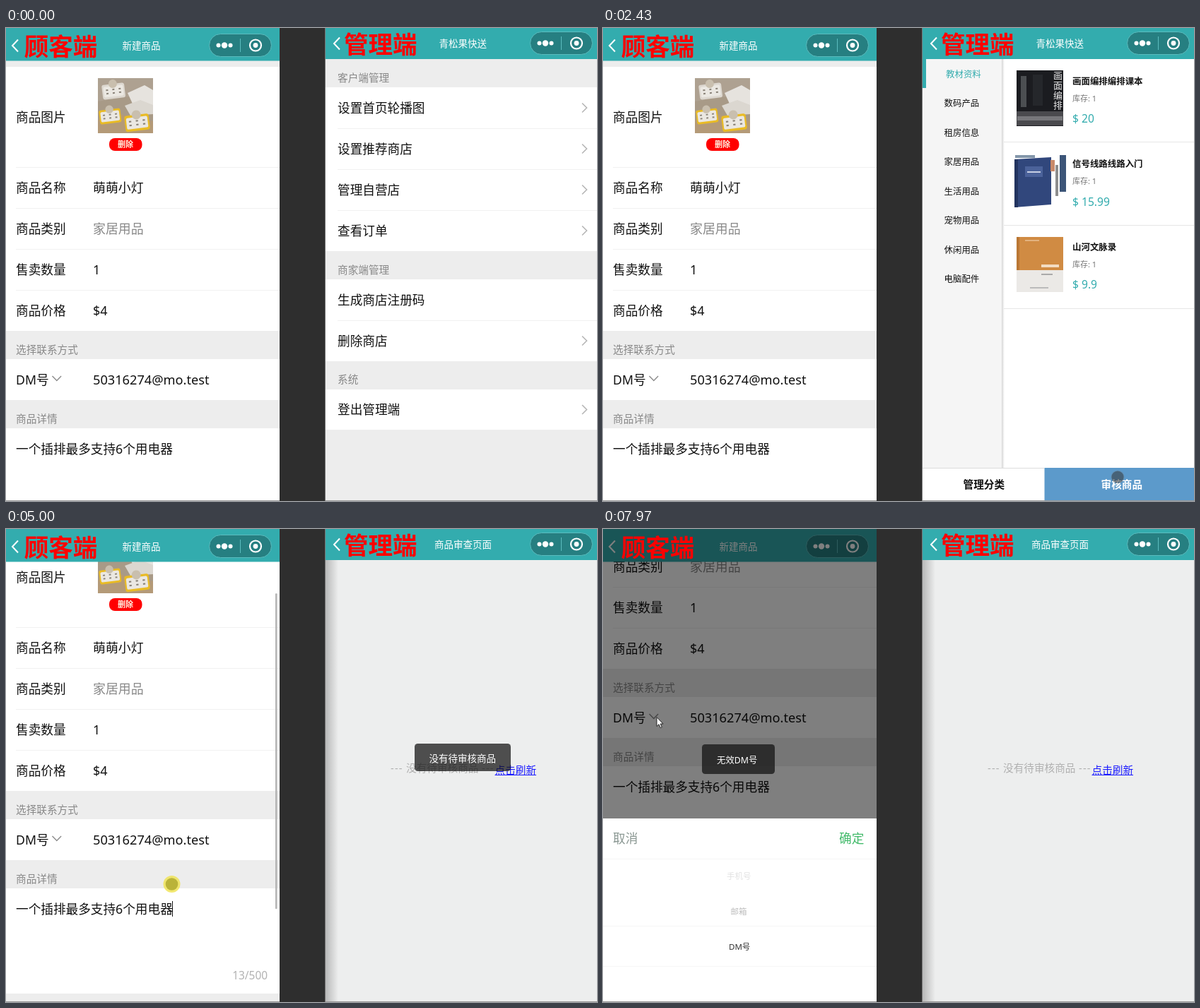
Write an HTML page that moves like this. It is 836 px wide and 670 px high and loops after 8000 ms.

```html
<!DOCTYPE html>
<html lang="zh-CN">
<head>
<meta charset="utf-8">
<title>新建商品与审核</title>
<style>
html, body { margin: 0; width: 100%; height: 100%; overflow: hidden; background: #2e2e2e; }
svg { display: block; width: 836px; height: 670px; }
text { font-family: 'Noto Sans', 'Noto Sans CJK SC', 'Noto Sans CJK', sans-serif; white-space: pre; }
</style>
</head>
<body>
<svg id="stage" viewBox="0 0 836 670" xmlns="http://www.w3.org/2000/svg"></svg>
<script>
const LOOP = 8000, TEAL = '#33acae', GREY = '#ededed', INK = '#111', DIM = '#888';
const BODY = 17.65, SMALL = 14.65, LEFT_W = 387;

// ---- drawing helpers: all return SVG markup ----
const rect = (x, y, w, h, fill, more = '') =>
  `<rect x="${x}" y="${y}" width="${w}" height="${h}" fill="${fill}" ${more}/>`;
const circle = (x, y, r, fill, more = '') =>
  `<circle cx="${x}" cy="${y}" r="${r}" fill="${fill}" ${more}/>`;
const path = (d, stroke, w, fill = 'none') =>
  `<path d="${d}" stroke="${stroke}" stroke-width="${w}" fill="${fill}"/>`;
const poly = (pts, fill) => `<polygon points="${pts}" fill="${fill}"/>`;
const group = (id, inner, more = '') => `<g id="${id}" ${more}>${inner}</g>`;
// cy is the middle of the line of text
const text = (x, cy, size, str, fill = INK, more = '') =>
  `<text x="${x}" y="${(cy + size * 0.37).toFixed(2)}" font-size="${size}" fill="${fill}" ${more}>${str}</text>`;
const BOLD = 'font-weight="700"';

function header(x, w, h, cy, backX, capX) {
  const c = cy - 0.5;
  return rect(x, 0, w, h, TEAL) +
    path(`M${backX + 8.5} ${cy - 8}l-8 8.5l8 8.5`, '#fff', 2) +
    rect(capX + 0.5, c - 15.5, 88, 32, '#267f81', 'rx="16" stroke="#5bbcbe"') +
    circle(capX + 13.5, c + 0.5, 3, '#fff') + circle(capX + 22, c + 0.5, 4.2, '#fff') +
    circle(capX + 30.5, c + 0.5, 3, '#fff') +
    rect(capX + 44, c - 9, 1, 19, '#5bbcbe') +
    circle(capX + 66, c + 0.5, 8, 'none', 'stroke="#fff" stroke-width="2.2"') +
    circle(capX + 66, c + 0.5, 3.4, '#fff');
}

function toast(id, x, y, w, h, inner) {
  return group(id, rect(x, y, w, h, '#111', 'rx="4.5" fill-opacity=".72"') + inner);
}

function lamp(x, y, s, band) {
  return `<g transform="translate(${x} ${y}) scale(${s}) rotate(-7)">` +
    rect(0, 0, 32, 21, band, 'rx="3"') + rect(2, 3, 28, 15, '#ebe8e2', 'rx="2"') +
    circle(16, 0, 6, '#c9bfae') +
    [7, 16, 25].map(i => rect(i - 1.5, 7, 3, 2, '#8a8378') + rect(i - 1.5, 12, 3, 2, '#8a8378')).join('') + '</g>';
}

// ---- left phone ----
function form() {
  const photo = rect(130, 71, 78, 78, '#a89a87') + poly('130,71 208,71 208,92 130,104', '#aea191') +
    poly('130,149 208,149 208,132 160,122 130,130', '#b49a78') +
    lamp(135, 81, 1, '#ddd8d0') + poly('172,92 196,81 208,88 208,112 184,118', '#e6e3de') +
    poly('168,110 190,102 208,109 208,122 176,124', '#dbd7d0') +
    lamp(131, 117, 0.95, '#e9bb25') + lamp(167, 125, 1.08, '#e9bb25');
  const rows = [[226, '商品名称', '萌萌小灯'], [284, '商品类别', '家居用品', DIM],
    [342, '售卖数量', '1'], [400, '商品价格', '$4']];
  return rect(0, 46, LEFT_W, 900, GREY) + rect(0, 55, LEFT_W, 374, '#fff') +
    text(14, 126.5, BODY, '商品图片') + photo +
    rect(146, 156, 46.5, 18, '#f00', 'rx="8"') +
    text(158, 164.8, 11, '删除', '#fff0e0', BOLD) +
    rows.map(([y, a, b, c]) => rect(14, y - 29, 373, 1, '#f1f1f1') +
      text(14, y, BODY, a) + text(123, y, 17.9, b, c)).join('') +
    text(14, 456, SMALL, '选择联系方式', DIM) +
    rect(0, 469, LEFT_W, 58, '#fff') + text(14, 498, BODY, 'DM号') +
    path('M65.5 493l6.3 6.5l6.3-6.5', '#8c8c8c', 1.4) +
    text(123, 498, 18.2, '50316274@mo.test') +
    text(14, 554, SMALL, '商品详情', DIM) +
    rect(0, 567, LEFT_W, 149, '#fff') + text(14, 596, BODY, '一个插排最多支持6个用电器') +
    text(370, 690, 15.4, '13/500', '#b2b2b2', 'text-anchor="end"') +
    text(15, 737, SMALL, '阅读', DIM) +
    text(47, 737, SMALL, '《会员提交物件处理细则》', '#576b95') +
    rect(61, 779, 273, 41, '#000', 'rx="20.5" opacity=".22" filter="url(#soft)"') +
    rect(55.5, 774, 273, 41, TEAL, 'rx="20.5"') +
    text(152.5, 795, 19.7, '保存发布', '#fff', BOLD) +
    rect(235, 585, 1, 22, '#111', 'id="caret"');
}

function picker() {
  return rect(0, 410, LEFT_W, 260, '#fff') +
    text(14, 438, BODY, '取消', '#8b9893') + text(334, 438, BODY, '确定', '#3fb968', 'font-weight="500"') +
    [467, 562, 619].map(y => rect(0, y, LEFT_W, 1, '#f6f6f6')).join('') +
    text(175, 491.5, 11.5, '手机号', '#e2e2e2') + text(180.5, 541.5, 11.5, '邮箱', '#bdbdbd') +
    text(178, 591.5, 11.5, 'DM号', '#333');
}

// ---- right phone ----
function menu() {
  const rows = [[113, '设置首页轮播图'], [171, '设置推荐商店'], [229, '管理自营店'], [287, '查看订单'],
    [385, '生成商店注册码'], [443, '删除商店'], [540.5, '登出管理端']];
  return rect(452, 44, 384, 626, GREY) +
    [[84, 232], [356, 116], [512, 57]].map(([y, h]) => rect(452, y, 384, h, '#fff')).join('') +
    rect(452, 200, 384, 58, '#ececec', 'id="press"') +
    [142, 200, 258, 414].map(y => rect(469, y, 367, 1, '#f1f1f1')).join('') +
    [[71, '客户端管理'], [343, '商家端管理'], [498, '系统']].map(([y, s]) => text(469, y, SMALL, s, DIM)).join('') +
    rows.map(([y, s]) => text(469, y, BODY, s) +
      (y === 385 ? '' : path(`M815 ${y - 6.5}l6.5 6.5l-6.5 6.5`, '#b6b6b6', 1.6))).join('');
}

function shop() {
  const kinds = ['教材资料', '数码产品', '租房信息', '家居用品', '生活用品', '宠物用品', '休闲用品', '电脑配件'];
  const goods = [['画面编排编排课本', '$ 20'], ['信号线路线路入门', '$ 15.99'], ['山河文脉录', '$ 9.9']];
  const books =
    rect(585, 60, 66, 79, '#1b1c20') + rect(591, 68, 8, 44, '#4c4f52') + rect(608, 66, 14, 44, '#25272b') +
    rect(585, 118, 66, 20, '#4a4a4e') + rect(586, 125, 64, 6, '#77777b') +
    [...'画面编排'].map((c, i) => text(637, 67 + i * 14, 13, c, '#e8e8e8')).join('') +
    poly('582,186 634,183 634,250 582,254', '#31477c') + poly('582,186 587,186 587,254 582,254', '#22345f') +
    rect(597, 196, 25, 15, '#4b629a') + rect(600, 203, 19, 2, '#c8d0e4') +
    rect(583, 180, 28, 4, '#8497aa') + rect(646, 180, 9, 52, '#3c5578') + rect(633, 187, 6, 16, '#c98a6a') +
    rect(640, 194, 4, 44, '#8d8d8d') +
    rect(585, 296, 66, 78, '#ebe9e6') + rect(585, 296, 66, 47, '#d08b43') + rect(585, 296, 4, 47, '#ba7735') +
    rect(597, 300, 20, 2, '#e3b27f') + rect(620, 335, 25, 4, '#f3dcc2') + rect(620, 348, 16, 2, '#aaa') +
    rect(604, 367, 26, 2, '#bbb');
  const list = rect(452, 44, 5, 41, TEAL) +
    kinds.map((s, i) => text(i ? 482.5 : 485, 65 + i * 41.5, 12.45, s, i ? INK : TEAL)).join('') + books +
    goods.map(([name, cost], i) => {
      const y = 75 + i * 117.8;
      return text(664, y, 12.45, name, INK, BOLD) + text(664, y + 24.5, 11, '库存: 1', '#777') +
        text(664, y + 53, 15.6, cost, TEAL) + rect(567, Math.round(y + 86), 269, 1, '#e6e6e6');
    }).join('');
  return rect(452, 44, 384, 626, '#fff') + rect(564, 44, 4, 579, 'url(#edge)') + rect(452, 44, 112, 579, '#f5f5f5') +
    group('list', list) +
    rect(452, 623, 384, 47, '#fff') + rect(452, 623, 172, 1, '#dcdcdc') + rect(624.5, 623, 212, 47, '#5c9acb') +
    text(509.5, 647, SMALL, '管理分类', INK, BOLD) + text(704.5, 647, SMALL, '审核商品', '#fff', BOLD);
}

function review() {
  const dash = 'letter-spacing="1.2"';
  return rect(452, 44, 384, 626, '#edeeee') + rect(452, 44, 18, 626, 'url(#shade)', 'id="shade-bar"') +
    text(544, 338.5, SMALL, '---', '#b0b0b0', dash) + text(566, 338.5, SMALL, '没有待审核商品', '#b0b0b0') +
    text(673, 338.5, SMALL, '---', '#b0b0b0', dash) +
    text(691.5, 342, SMALL, '点击刷新', '#1a1aff') + rect(691.5, 348, 58.5, 1, '#1a1aff');
}

const spokes = Array.from({ length: 12 }, (_, i) =>
  `<line x1="0" y1="-9" x2="0" y2="-15" stroke="#eee" stroke-width="2.6" stroke-linecap="round" ` +
  `opacity="${(0.2 + i * 0.065).toFixed(2)}" transform="rotate(${i * 30})"/>`).join('');

const fade = (id, color, alpha) => `<linearGradient id="${id}">` +
  `<stop stop-color="${color}" stop-opacity="${alpha}"/><stop offset="1" stop-color="${color}" stop-opacity="0"/></linearGradient>`;

document.getElementById('stage').innerHTML =
  '<defs>' + fade('edge', '#888', 0.35) + fade('shade', '#777', 0.45) +
  '<filter id="soft" x="-10%" y="-40%" width="120%" height="180%"><feGaussianBlur stdDeviation="2.5"/></filter>' +
  `<clipPath id="left">${rect(0, 46, LEFT_W, 624, '#000')}</clipPath>` +
  `<clipPath id="right">${rect(452, 44, 384, 626, '#000')}</clipPath>` +
  `<clipPath id="phone">${rect(0, 0, LEFT_W, 670, '#000')}</clipPath></defs>` +
  rect(LEFT_W, 0, 65, 670, '#2e2e2e') +
  group('left-view', group('form', form()) + rect(381, 46, 2.5, 447, '#b3b3b3', 'id="bar" rx="1"'), 'clip-path="url(#left)"') +
  header(0, LEFT_W, 46.5, 24.5, 8.5, 287) + text(164.5, 24.5, 13.5, '新建商品', '#fff') +
  rect(0, 0, LEFT_W, 670, '#000', 'id="mask"') +
  group('sheet-view', group('picker', picker()), 'clip-path="url(#phone)"') +
  toast('invalid', 140, 305, 103, 42, text(161, 327, 12.4, '无效DM号', '#fff')) +
  text(25.8, 25.8, 34.5, '顾客端', '#f00', BOLD) +
  group('right-view', menu() + group('shop', shop()) + group('review', review()), 'clip-path="url(#right)"') +
  header(452, 384, 44, 21.5, 463.5, 741) + rect(451, 0, 1, 670, '#777') +
  text(612.5, 21.5, 13.5, '青松果快送', '#fff', 'id="title-a"') +
  text(606, 21.5, 13.5, '商品审查页面', '#fff', 'id="title-b"') +
  toast('loading', 584, 211.5, 124.5, 124.5, `<g transform="translate(647 263)">${group('spin', spokes)}</g>` +
    text(624.5, 302.5, SMALL, '加载中', '#ddd')) +
  toast('empty', 578, 304, 136, 39, text(598.5, 325, 13.5, '没有待审核商品', '#fff')) +
  text(478, 23.6, 34.5, '管理端', '#f00', BOLD) +
  rect(0, 669, LEFT_W, 1, '#999') + rect(452, 669, 384, 1, '#999') +
  group('cursor',
    group('click', circle(0, 0, 12, '#efe24d', 'opacity=".8"') + circle(0, 0, 8.8, '#bab339')) +
    group('dot', circle(0, 0, 9.6, '#777', 'opacity=".25"') + circle(0, 0, 8.6, '#222', 'opacity=".42"')) +
    group('arrow', path('M0.5 0.5V13.5L3.5 10.7L5.7 15.6L7.8 14.7L5.7 10H9.6Z', '#222', 1, '#fff')));

// ---- timing ----
const el = {};
document.querySelectorAll('#stage [id]').forEach(n => { el[n.id] = n; });
const show = (id, on) => { el[id].style.display = on ? '' : 'none'; };
const move = (id, x, y) => el[id].setAttribute('transform', `translate(${x.toFixed(2)} ${y.toFixed(2)})`);
const span = (t, a, b) => Math.min(1, Math.max(0, (t - a) / (b - a)));
const out = p => 1 - (1 - p) ** 3;
const smooth = p => p * p * (3 - 2 * p);

// pointer stops: time, x, y
const stops = [[390, 758, 690], [1010, 549, 229], [2050, 549, 229], [2430, 728, 636], [2660, 733, 652],
  [2960, 733, 654], [3850, 733, 654], [3930, 724, 652], [4090, 722, 650], [4850, 234.5, 503],
  [5400, 234.5, 503], [5550, 240, 508], [5780, 240, 508], [6100, 235.5, 568], [7190, 235.5, 568], [7550, 75.5, 266]];

function pointer(t) {
  const i = stops.findIndex(s => s[0] > t);
  if (i === 0) return [stops[0][1], stops[0][2]];
  if (i < 0) return stops[stops.length - 1].slice(1);
  const [a, b] = [stops[i - 1], stops[i]], p = smooth(span(t, a[0], b[0]));
  return [a[1] + (b[1] - a[1]) * p, a[2] + (b[2] - a[2]) * p];
}

function draw(t) {
  const inside = (a, b) => t >= a && t < b;

  // right phone
  show('press', inside(1180, 1900));
  show('shop', t >= 1450);
  move('shop', 384 * (1 - out(span(t, 1450, 1850))), 0);
  show('list', t >= 2050);
  show('review', t >= 3281);
  move('review', 384 * (1 - out(span(t, 3281, 3681))), 0);
  show('shade-bar', t >= 3690);
  show('title-a', t < 3200);
  show('title-b', t >= 3200);
  show('loading', inside(3200, 3690));
  el.spin.setAttribute('transform', `rotate(${Math.floor(t / 83) * 30 % 360})`);
  show('empty', inside(3690, 5190));

  // left phone
  const scroll = 58 * out(span(t, 4900, 4990)) + 173 * smooth(span(t, 5070, 5400));
  move('form', 0, -scroll);
  move('bar', 0, scroll * 0.78);
  el.bar.style.opacity = t < 4900 ? 0 : 1 - 0.93 * span(t, 5500, 5760) - 0.07 * span(t, 5800, 6100);
  show('caret', inside(4900, 5500));
  show('invalid', t >= 6500);
  const open = out(span(t, 7600, 7900));
  el.mask.style.opacity = 0.5 * open;
  show('picker', open > 0);
  move('picker', 0, 260 * (1 - open));

  // pointer
  const arrow = inside(3000, 4750) || t >= 7350, click = inside(4900, 5080);
  move('cursor', ...pointer(t));
  show('arrow', arrow);
  show('click', click);
  show('dot', !arrow && !click);
}

const start = performance.now();
function tick() {
  draw((performance.now() - start) % LOOP);
  requestAnimationFrame(tick);
}
draw(0);
requestAnimationFrame(tick);
</script>
</body>
</html>
```
